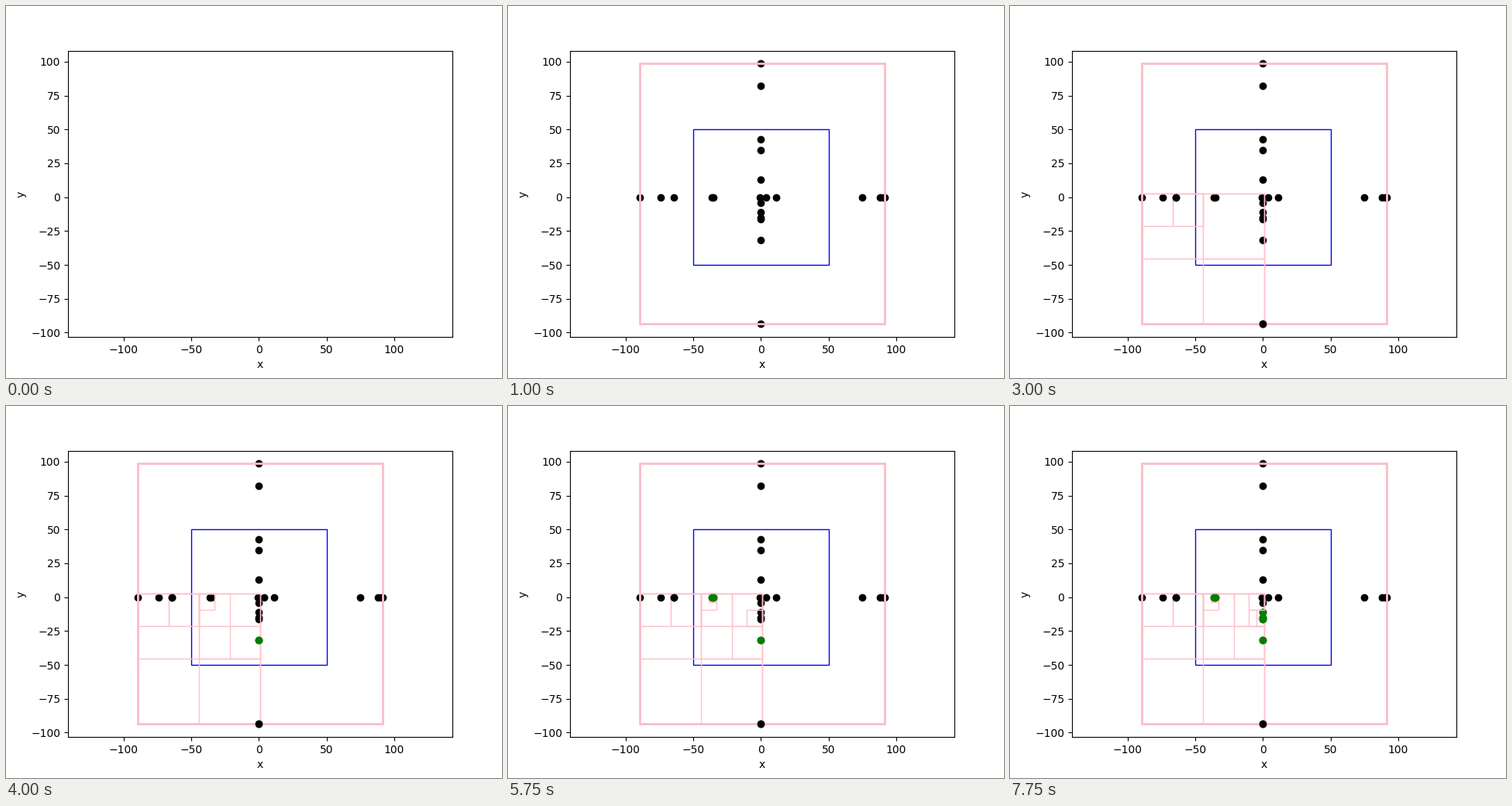
Animation, 640 px wide and 480 px high, one loop 8 s. Source, as a matplotlib script:

```python
from itertools import islice

import matplotlib.pyplot as plt
from matplotlib.animation import FuncAnimation
from matplotlib.patches import Rectangle

FRAMES, INTERVAL = 32, 250
QUERY = (-50, -50, 50, 50)

ON_X = [-89.3, -73.8, -64.2, -36.1, -35.0, -0.6, 3.9, 11.4, 74.8, 88.0, 90.0, 91.3]
ON_Y = [98.6, 82.0, 42.5, 35.0, 13.0, -4.3, -11.2, -15.0, -16.3, -31.8, -93.7]
POINTS = [(x, 0) for x in ON_X] + [(0, y) for y in ON_Y]
ROOT = (min(ON_X), min(ON_Y), max(ON_X), max(ON_Y))

fig, ax = plt.subplots(figsize=(6.4, 4.8), dpi=100)
mid_x, mid_y = (ROOT[0] + ROOT[2]) / 2, (ROOT[1] + ROOT[3]) / 2
half_y = 0.55 * (ROOT[3] - ROOT[1])
half_x = half_y * 496 / 369.6
ax.set_xlim(mid_x - half_x, mid_x + half_x)
ax.set_ylim(mid_y - half_y, mid_y + half_y)
ax.set_autoscale_on(False)
ax.set_xlabel("x")
ax.set_ylabel("y")


def draw_box(box, color, width=1):
    x0, y0, x1, y1 = box
    return ax.add_patch(Rectangle((x0, y0), x1 - x0, y1 - y0, fill=False,
                                  edgecolor=color, linewidth=width))


def draw_dots(points, color):
    return ax.scatter(*zip(*points), color=color, zorder=1)


def overlaps(a, b):
    return a[0] <= b[2] and b[0] <= a[2] and a[1] <= b[3] and b[1] <= a[3]


def inside(point, box):
    return box[0] <= point[0] <= box[2] and box[1] <= point[1] <= box[3]


def quarters(box, points):
    """Non-empty quadrants in the order SW, SE, NW, NE."""
    x0, y0, x1, y1 = box
    mx, my = (x0 + x1) / 2, (y0 + y1) / 2
    for top in (False, True):
        for right in (False, True):
            part = [p for p in points if (p[0] >= mx, p[1] >= my) == (right, top)]
            if part:
                xs = (mx, x1) if right else (x0, mx)
                ys = (my, y1) if top else (y0, my)
                yield (xs[0], ys[0], xs[1], ys[1]), part


def search(box, points, width=1):
    """Range search on the quadtree, one drawn artist per step."""
    yield draw_box(box, "pink", width)
    if not overlaps(box, QUERY):
        return
    if len(points) == 1:
        yield draw_dots(points, "green" if inside(points[0], QUERY) else "black")
        return
    for child, part in quarters(box, points):
        yield from search(child, part)


steps = [draw_dots(POINTS, "black"), draw_box(ROOT, "black"), draw_box(QUERY, "blue")]
steps += islice(search(ROOT, POINTS, 2), FRAMES - 1 - len(steps))


def update(i):
    for k, artist in enumerate(steps):
        artist.set_visible(k < i)
    return steps


anim = FuncAnimation(fig, update, frames=FRAMES, interval=INTERVAL,
                     repeat=True, repeat_delay=0, blit=False)
plt.show()
```
